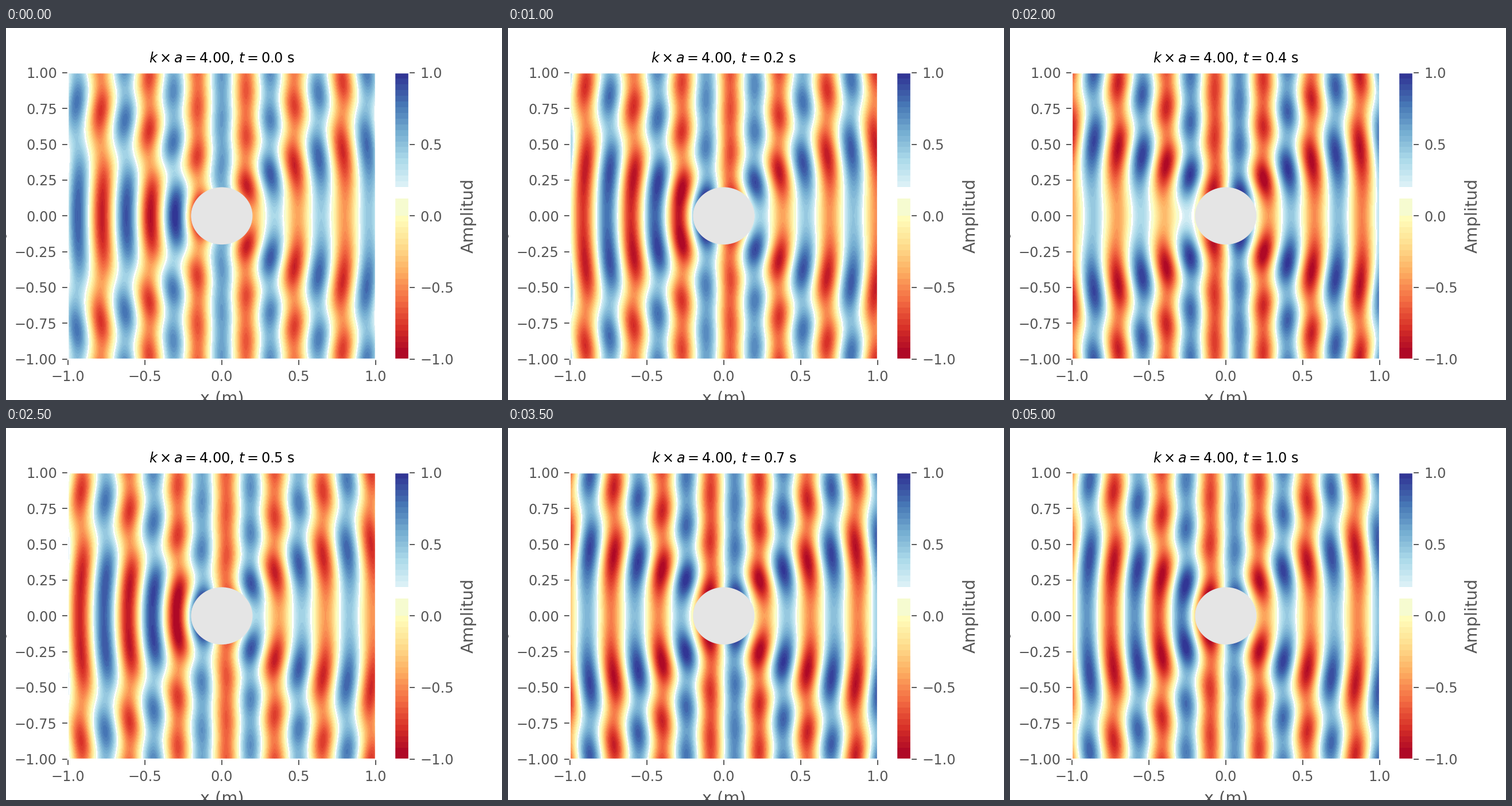
A matplotlib script that plays this animation: 864x648 px, repeating every 5.5 s.

```python
import numpy as np
import matplotlib.pyplot as plt
from matplotlib.animation import FuncAnimation
from matplotlib.cm import ScalarMappable
from matplotlib.colors import BoundaryNorm, ListedColormap
from matplotlib.patches import Ellipse
from matplotlib.ticker import ScalarFormatter

W, H, DPI = 864, 648, 172.8
K, A, C = 20.0, 0.2, 1.0          # wavenumber, radius, wave speed
FRAMES, STEP_MS, DT = 11, 500, 0.1
TERMS = 2                         # monopole and dipole
GREY = "#555555"

plt.rcParams.update({
    "font.family": "DejaVu Sans",
    "font.size": 10,
    "mathtext.fontset": "dejavusans",
    "axes.labelsize": 12,
    "axes.labelcolor": GREY,
    "axes.labelpad": 5,
    "axes.edgecolor": "white",
    "axes.linewidth": 1,
    "axes.facecolor": "#e5e5e5",
})
for side in ("xtick", "ytick"):
    plt.rcParams.update({
        f"{side}.color": GREY,
        f"{side}.major.size": 4,
        f"{side}.major.pad": 4,
        f"{side}.major.width": 0.8,
    })


def quad(lo, hi, n=160):
    s, w = np.polynomial.legendre.leggauss(n)
    return lo + (hi - lo) * (s + 1) / 2, w * (hi - lo) / 2


def hankel(n, z):
    """Hankel function of the first kind, integer order n, for z > 3."""
    z = np.atleast_1d(z)[:, None]
    s, ws = quad(0, np.pi)
    t, wt = quad(0, 5)
    wave = np.exp(1j * (z * np.sin(s) - n * s)) @ ws
    tail = ((np.exp(n * t) + (-1) ** n * np.exp(-n * t))
            * np.exp(-z * np.sinh(t))) @ wt
    return (wave - 1j * tail) / np.pi


def hankel_slope(n, z):
    return n / z * hankel(n, z) - hankel(n + 1, z)


def pressure(x, y):
    """Complex amplitude of a plane wave plus its scattered part."""
    r, th = np.hypot(x, y), np.arctan2(y, x)
    rs = np.linspace(0.85 * A, 1.45, 1500)
    total = np.exp(1j * K * x)
    for n in range(TERMS):
        slope = hankel_slope(n, K * A)[0]
        coef = -(1 if n == 0 else 2) * 1j ** (n + 1) * slope.real / slope
        radial = np.interp(r, rs, hankel(n, K * rs))
        total = total + coef * radial * np.cos(n * th)
    return total


axis = np.linspace(-1, 1, 200)
X, Y = np.meshgrid(axis, axis)
field = pressure(X, Y)
outside = np.hypot(X, Y) >= A

# 50 colour bands; the faint ones just above zero fade to white
levels = np.linspace(-1, 1, 51)
mids = (levels[1:] + levels[:-1]) / 2
bands = plt.get_cmap("RdYlBu")((mids / 0.98 + 1) / 2)
bands[(mids > 0.12) & (mids < 0.2)] = 1
bands[(mids > 0) & (mids < 0.12)] = bands[26]
bands[0] = bands[1]
cmap = ListedColormap(bands)
norm = BoundaryNorm(levels, 50)

fig, ax = plt.subplots(figsize=(W / DPI, H / DPI), dpi=DPI, facecolor="white")
fig.subplots_adjust(left=0.125, right=0.9, bottom=0.11, top=0.88)
bar = fig.colorbar(ScalarMappable(norm, cmap), ax=ax, spacing="proportional",
                   ticks=[-1, -0.5, 0, 0.5, 1], format=ScalarFormatter())
bar.minorticks_off()
bar.set_label("Amplitud")
bar.outline.set_edgecolor("white")
bar.outline.set_linewidth(1)

ax.set(xlim=(-1, 1), ylim=(-1, 1),
       xticks=np.linspace(-1, 1, 5), yticks=np.linspace(-1, 1, 9))
ax.set_xlabel("x (m)")
ax.set_ylabel("y (m)", labelpad=5.5)
ax.add_patch(Ellipse((0, 0), 2 * A, 2 * A, fc="#e5e5e5", ec="none", zorder=2))
title = fig.text(376 / W, 1 - 60 / H, "", ha="center", va="baseline",
                 color="black", fontsize=10)
drawn = []


def update(i):
    while drawn:
        drawn.pop().remove()
    t = i * DT
    p = (field * np.exp(-1j * K * C * t)).real
    p = np.clip(p / np.abs(p[outside]).max(), -0.999, 0.999)
    drawn.append(ax.contourf(X, Y, p, levels=levels, cmap=cmap, norm=norm,
                             zorder=1))
    title.set_text(rf"$k\times a={K * A:.2f}$, $t={t:.1f}$ s")
    return drawn + [title]


anim = FuncAnimation(fig, update, frames=FRAMES, interval=STEP_MS,
                     repeat=True, repeat_delay=0, blit=False)
plt.show()
```
